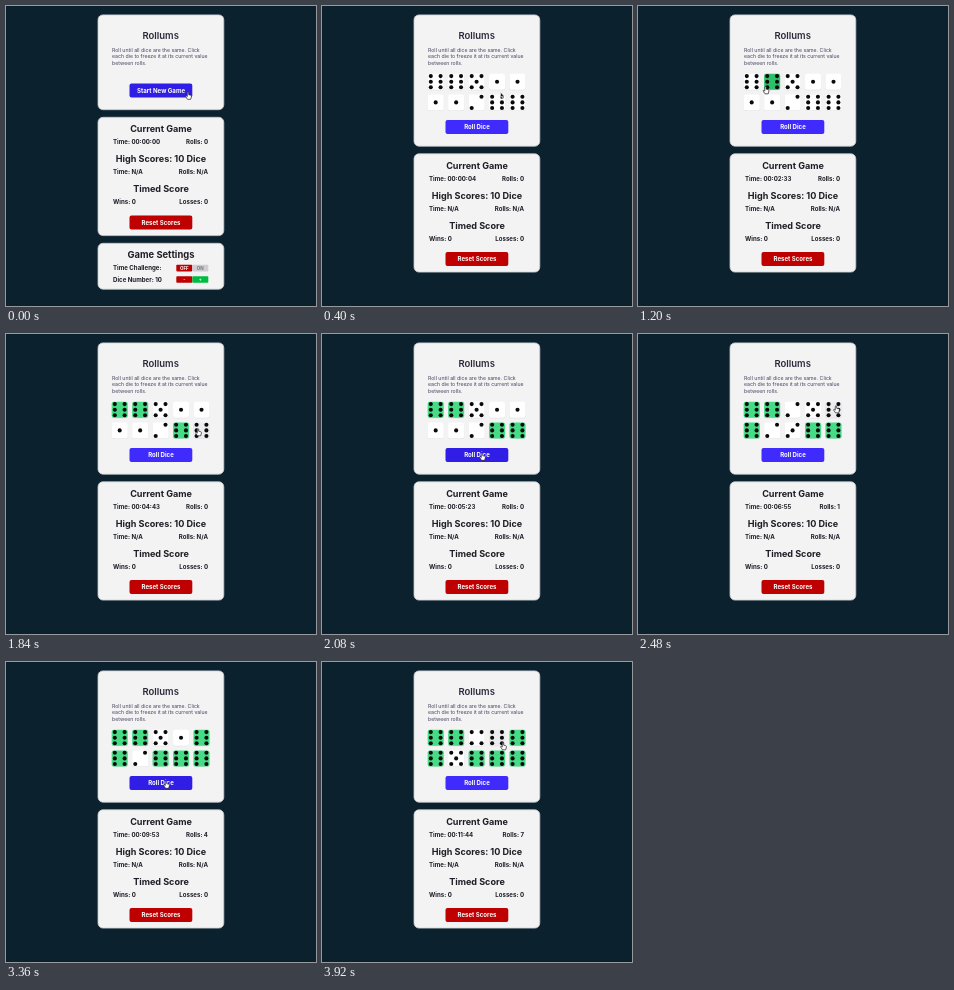
Write an HTML page that moves like this. It is 310 px wide and 300 px high and loops after 4 s.

```html
<!DOCTYPE html>
<html lang="en">
<head>
<meta charset="utf-8">
<title>Dice game</title>
<style>
html, body { margin: 0; width: 100%; height: 100%; overflow: hidden; background: #0c212e; }
svg { display: block; width: 310px; height: 300px; font-family: Inter, Roboto, sans-serif; }
text { white-space: pre; }
</style>
</head>
<body>
<svg id="stage" viewBox="0 0 310 300"></svg>
<script>
const LOOP = 4000, STEP = 80, START = 400, SHIFT = 36.5;
const BLUE = '#402bfe', BLUE_HOVER = '#301de6', RED = '#be0000', CARD = '#f3f3f4';
const stage = document.getElementById('stage');

function add(parent, tag, attrs, content) {
  const el = document.createElementNS('http://www.w3.org/2000/svg', tag);
  set(el, attrs);
  if (content !== undefined) el.textContent = content;
  parent.appendChild(el);
  return el;
}
function set(el, attrs) {
  for (const key in attrs) el.setAttribute(key, attrs[key]);
}
const group = parent => add(parent, 'g', {});
const box = (parent, x, y, width, height, fill, rx = 0) =>
  add(parent, 'rect', { x, y, width, height, fill, rx });
function card(parent, y, height) {
  const rect = box(parent, 92, y, 125.8, height, CARD, 5);
  set(rect, { stroke: '#c6cbd0', 'stroke-width': 0.8 });
  return rect;
}
const label = (parent, x, y, size, content, anchor = 'start', fill = '#1d1d25', weight = 700) =>
  add(parent, 'text', { x, y, 'font-size': size, 'font-weight': weight, 'text-anchor': anchor, fill }, content);
const heading = (parent, y, content, size = 9.05) => label(parent, 155, y, size, content, 'middle');
const row = (parent, y, left, right) =>
  [label(parent, 107, y, 6.1, left), label(parent, 202, y, 6.1, right, 'end')];
function button(parent, y, content, fill) {
  const rect = box(parent, 123.5, y, 62.8, 14, fill, 2);
  label(parent, 155, y + 9.3, 6.1, content, 'middle', '#fff');
  return rect;
}
function chip(parent, x, y, content, fill, color = '#fff') {
  box(parent, x, y, 16, 6.6, fill, 0.8);
  label(parent, x + 8, y + 5, 4.5, content, 'middle', color);
}

// Top card
const topCard = card(stage, 8.9, 94.8);
label(stage, 154.7, 33, 9.5, 'Rollums', 'middle', '#2b2a3a', 600);
['Roll until all dice are the same. Click',
 'each die to freeze it at its current value',
 'between rolls.'].forEach((line, i) =>
  label(stage, 106, 46 + i * 6.4, 5.2, line, 'start', '#45425f', 400));
const startView = group(stage), playView = group(stage);
button(startView, 77.6, 'Start New Game', BLUE_HOVER);
const rollButton = button(playView, 77.6 + SHIFT, 'Roll Dice', BLUE);

// Score card
const scores = group(stage);
card(scores, 111.3, 118.3);
heading(scores, 126.2, 'Current Game');
const [timeText, rollText] = row(scores, 138, 'Time: 00:00:00', 'Rolls: 0');
heading(scores, 156.2, 'High Scores: 10 Dice');
row(scores, 168, 'Time: N/A', 'Rolls: N/A');
heading(scores, 186.2, 'Timed Score');
row(scores, 198, 'Wins: 0', 'Losses: 0');
button(scores, 209.4, 'Reset Scores', RED);

// Settings card
card(startView, 237.3, 45.9);
heading(startView, 252, 'Game Settings', 9.4);
row(startView, 264.2, 'Time Challenge:', '');
row(startView, 275.8, 'Dice Number: 10', '');
chip(startView, 170.3, 258.8, 'OFF', RED);
chip(startView, 186.3, 258.8, 'ON', '#cfcfd2', '#77777d');
chip(startView, 170.3, 270.2, '-', RED);
chip(startView, 186.3, 270.2, '+', '#00bd42');

// Dice: pips 0-8 on a 3x3 grid
const PIPS = ['', '4', '26', '246', '0268', '02468', '023568'];
const dice = Array.from({ length: 10 }, (_, i) => {
  const cx = 113.7 + (i % 5) * 20.45, cy = i < 5 ? 75.7 : 96.4;
  box(playView, cx - 8, cy - 7.4, 16, 16, '#dcdce0', 2);
  const face = box(playView, cx - 8, cy - 8, 16, 16, '#fff', 2);
  const pips = Array.from({ length: 9 }, (_, p) => add(playView, 'circle', {
    cx: cx + (p % 3 - 1) * 4.9, cy: cy + (Math.floor(p / 3) - 1) * 5.6, r: 2.05, fill: '#0a0a0a'
  }));
  return { cx, cy, face, pips };
});

const cursor = (d, fill, stroke) => add(stage, 'path', {
  d, fill, stroke, 'stroke-width': 0.7, 'stroke-linejoin': 'round'
});
const hand = cursor('M-.7 .6Q0-.4.7.6V2.7L2.7 3.2Q3.6 3.5 3.4 4.6L2.7 7.3H-.5L-2.3 4.6Q-2.5 3.7-1.6 3.8L-.7 4.6Z',
  '#fff', '#222');
const arrow = cursor('M0 0V5.2L1.2 4.2 2 6 2.9 5.6 2.1 3.8H3.7Z', '#111', '#eee');

const ROLLS = [
  [400, '6651111266'], [2160, '6625662366'], [2720, '6615661666'], [3120, '6632664666'],
  [3280, '6651662666'], [3440, '6623663666'], [3600, '6614662666'], [3680, '6646665666']
];
const FREEZE = [1440, 960, Infinity, Infinity, 2560, 2320, Infinity, 2960, 1760, 1920];
const CLOCK = [[400, 4], [1200, 233], [1840, 443], [2480, 655], [2880, 789], [3920, 1144]];
const PATH = [
  [0, 182, 86], [320, 182, 86], [400, 178.5, 86.2], [560, 155, 82], [720, 128, 79.5],
  [1200, 127.5, 80.5], [1360, 113, 79], [1520, 113, 80], [1680, 165, 87], [1760, 176, 94],
  [1840, 192, 94.5], [1920, 192, 95], [2080, 160, 119], [2160, 160, 119], [2320, 113, 97],
  [2480, 198, 71.5], [2560, 198, 72], [2720, 160, 119], [2880, 149.5, 94], [2960, 150, 95],
  [3120, 160, 119], [3680, 160, 119], [3840, 180, 83], [3920, 181, 80.5]
];

function sample(points, t, k) {
  const i = points.findIndex(p => p[0] >= t);
  if (i === 0) return points[0][k];
  if (i < 0) return points[points.length - 1][k];
  const a = points[i - 1], b = points[i];
  return a[k] + (b[k] - a[k]) * (t - a[0]) / (b[0] - a[0]);
}
const show = (el, on) => { el.style.display = on ? '' : 'none'; };
const pad = n => String(n).padStart(2, '0');

function draw(ms) {
  const t = Math.floor(ms % LOOP / STEP) * STEP;
  const playing = t >= START;
  const x = sample(PATH, t, 1), y = sample(PATH, t, 2);

  show(startView, !playing);
  show(playView, playing);
  topCard.setAttribute('height', playing ? 94.8 + SHIFT : 94.8);
  scores.setAttribute('transform', `translate(0 ${playing ? SHIFT : 0})`);

  const cs = playing ? Math.round(sample(CLOCK, t, 1)) : 0;
  timeText.textContent = `Time: 00:${pad(Math.floor(cs / 100))}:${pad(cs % 100)}`;
  const rolls = Math.max(0, ROLLS.filter(r => r[0] <= t).length - 1);
  rollText.textContent = `Rolls: ${rolls}`;
  const onRoll = y > 114 && y < 128;
  rollButton.setAttribute('fill', onRoll ? BLUE_HOVER : BLUE);

  let clickable = !playing || onRoll;
  dice.forEach((die, i) => {
    const hover = Math.abs(x - die.cx) < 8 && Math.abs(y - die.cy) < 8;
    const frozen = t >= FREEZE[i];
    clickable = clickable || hover;
    die.face.setAttribute('fill', frozen ? (hover ? '#2cc069' : '#45dc85') : (hover ? '#ececef' : '#fff'));
    const pips = PIPS[ROLLS[rolls][1][i]];
    die.pips.forEach((pip, p) => show(pip, pips.includes(p)));
  });

  for (const el of [hand, arrow]) el.setAttribute('transform', `translate(${x} ${y})`);
  show(hand, clickable);
  show(arrow, !clickable);
}

function tick() {
  draw(performance.now());
  requestAnimationFrame(tick);
}
tick();
</script>
</body>
</html>
```
